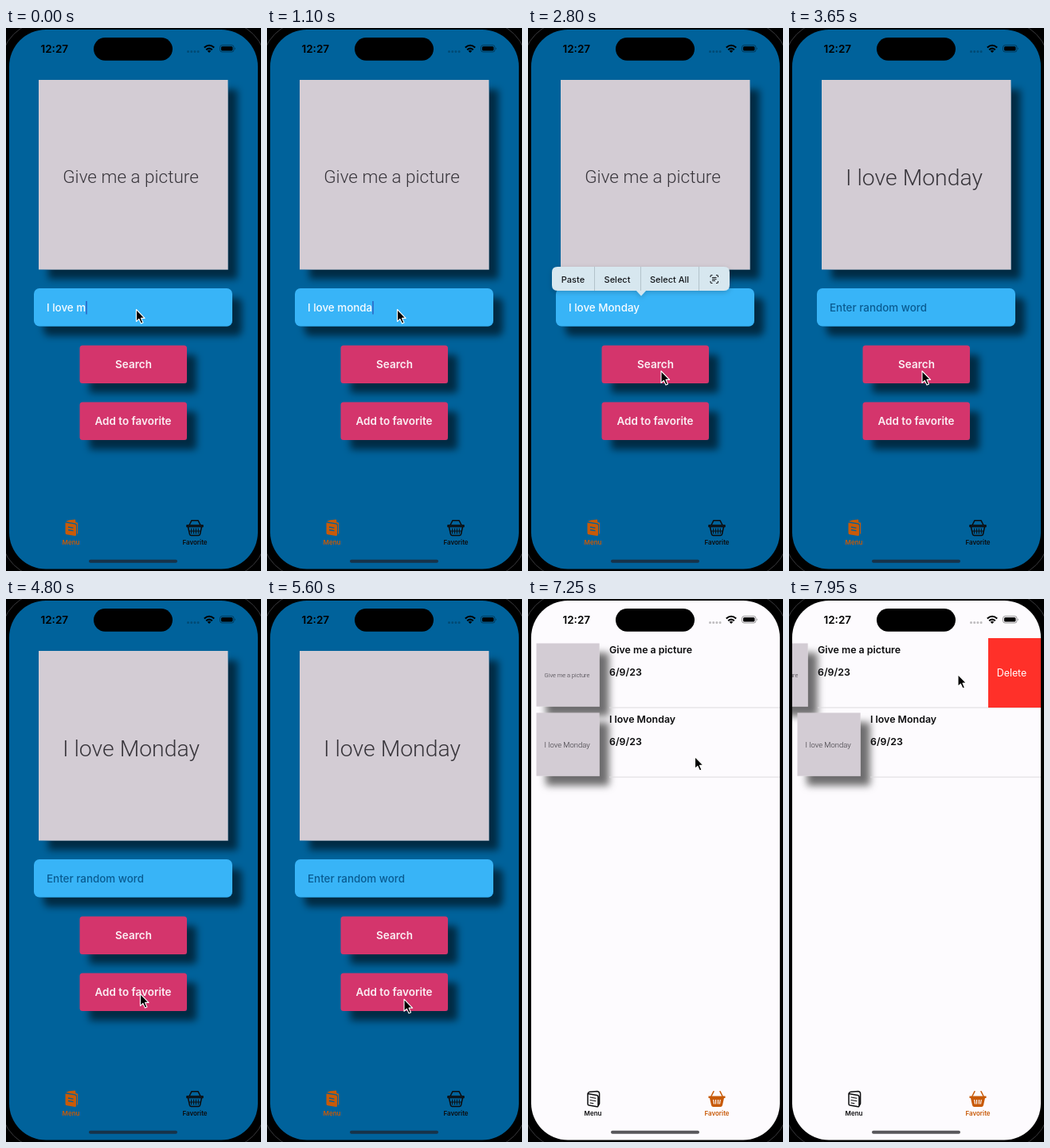
Write an HTML page that moves like this. It is 320 px wide and 680 px high and loops after 8 s.

```html
<!DOCTYPE html>
<html lang="en">
<head>
<meta charset="utf-8">
<title>Picture search</title>
<style>
  html, body { margin: 0; width: 100%; height: 100%; overflow: hidden; background: #000; }
  svg { display: block; width: 320px; height: 680px; font-family: Inter, "Open Sans", sans-serif; }
  .pic { font-family: Roboto, "Open Sans", sans-serif; font-weight: 300; fill: #38353b; text-anchor: middle; }
  .button { font-size: 13.5px; font-weight: 600; fill: #fbeef3; text-anchor: middle; }
  .field { font-size: 13.4px; font-weight: 550; }
  .list { font-size: 12.4px; font-weight: 600; fill: #0c0c0e; }
  .menu { font-size: 11px; font-weight: 500; fill: #15181c; text-anchor: middle; }
  .tab { font-size: 8px; font-weight: 600; text-anchor: middle; stroke: none; fill: currentColor; }
  .line { fill: none; stroke: currentColor; stroke-width: 1.5; stroke-linejoin: round; stroke-linecap: round; }
  .solid { fill: currentColor; }
</style>
</head>
<body>
<svg viewBox="0 0 320 680">
  <defs>
    <clipPath id="screen"><rect x="4" y="2" width="312" height="675.5" rx="46"/></clipPath>
    <filter id="shade" x="-20%" y="-40%" width="150%" height="200%">
      <feDropShadow dx="12" dy="12" stdDeviation="4.8" flood-color="#000" flood-opacity=".57"/>
    </filter>
    <filter id="soft" x="-20%" y="-30%" width="140%" height="180%">
      <feDropShadow dx="0" dy="2" stdDeviation="3" flood-opacity=".2"/>
    </filter>
    <g id="askPicture">
      <rect width="237.500" height="237.500" fill="#d3ccd4"/>
      <text class="pic" x="115.500" y="129" font-size="22.500">Give me a picture</text>
    </g>
    <g id="dayPicture">
      <rect width="237.500" height="237.500" fill="#d3ccd4"/>
      <text class="pic" x="116" y="132" font-size="28.400">I love Monday</text>
    </g>
    <g id="bookLine" class="line">
      <path d="M75 619.500 86.500 621.500Q88 622 88 623.500V634.500Q88 636 86.500 635.700L76.500 634Q75 633.700 75 632.200ZM75 619.500Q75.500 617.500 77.500 617.200L87 616.500Q89.500 617 89.600 619.500V632L88 635"/>
      <path d="M78 624 85 625.200M78 627.500 85 628.700M78 631 82 631.700" stroke-width="1.100"/>
    </g>
    <g id="bookSolid">
      <path class="solid" d="M74.500 619.500 86.500 621.500Q88 622 88 623.500V634.500Q88 636.300 86.500 636L76 634.300Q74.500 634 74.500 632.200ZM75 618 79 616.300 87 615.500 87.500 619 90 619.500V633L89 634V622Q88.800 620.800 87 620.300Z"/>
      <path d="M78 625 84.500 626.100M78 628.500 84.500 629.600" stroke="#00629b" stroke-width="1.300"/>
    </g>
    <g id="basketLine" class="line">
      <path d="M227 622.800H247V624.500H227ZM228.500 625 230.500 634Q231 635.500 232.500 635.500H241.500Q243 635.500 243.500 634L245.500 625M230 622.500 233 616.700H241L244 622.500"/>
      <path d="M232.700 627V633M235.600 627V633M238.400 627V633M241.300 627V633M230 630H244" stroke-width="1"/>
    </g>
    <g id="basketSolid">
      <path class="solid" d="M226.500 622.500H247.500V625H246L244 634Q243.500 636 241.500 636H232.500Q230.500 636 230 634L228 625H226.500Z"/>
      <path class="line" d="M230 622.500 233 616.700M244 622.500 241 616.700"/>
      <path d="M232.700 627 233.600 632.500M235.600 627V632.500M238.500 627V632.500M241.300 627 240.400 632.500" stroke="#fdfbfe" stroke-width="1.200"/>
    </g>
  </defs>

  <rect width="320" height="680" fill="#000"/>
  <rect x="-7" y="-9" width="334" height="698" rx="57" fill="none" stroke="#39393c"/>

  <g clip-path="url(#screen)">
    <rect id="back" width="320" height="680"/>

    <g id="menuPage">
      <g filter="url(#shade)"><use id="picture" x="41" y="65" href="#askPicture"/></g>
      <rect x="35" y="326" width="249" height="47.500" rx="7" fill="#39b4f7" filter="url(#shade)"/>
      <rect id="mark" y="341" height="19" fill="#00559b" fill-opacity=".38"/>
      <text class="field" x="51" y="354.800"><tspan id="typed"></tspan><tspan id="word"></tspan></text>
      <rect id="caret" y="342" width="1.500" height="16.500" fill="#2a62c4"/>
      <g id="searchButton">
        <rect x="92.500" y="397.500" width="134.500" height="47.500" rx="3.500" fill="#d4366c" filter="url(#shade)"/>
        <text class="button" x="160" y="426">Search</text>
      </g>
      <g id="addButton">
        <rect x="92.500" y="468.500" width="134.500" height="47.500" rx="3.500" fill="#d4366c" filter="url(#shade)"/>
        <text class="button" x="159.500" y="497">Add to favorite</text>
      </g>
      <g id="popup">
        <path filter="url(#soft)" fill="#d7e7ef" d="M37 299H246Q253 299 253 306V322Q253 329 246 329H148L142 335.500 136 329H37Q30 329 30 322V306Q30 299 37 299Z"/>
        <path d="M83.500 299V329M141.500 299V329M214.500 299V329" stroke="#b3c3cb"/>
        <text class="menu" x="56.500" y="318.500">Paste</text>
        <text class="menu" x="112" y="318.500">Select</text>
        <text class="menu" x="177.500" y="318.500">Select All</text>
        <path fill="none" stroke="#15181c" stroke-width="1.100" d="M229 312V311Q229 309.500 230.500 309.500H231.500M236 309.500H237Q238.500 309.500 238.500 311V312M238.500 317V318Q238.500 319.500 237 319.500H236M231.500 319.500H230.500Q229 319.500 229 318V317M231 312.500H236.500M231 314.500H236.500M231 316.500H235"/>
      </g>
    </g>

    <g id="listPage">
      <g id="firstRow">
        <g filter="url(#shade)"><use href="#askPicture" transform="translate(10.500 55.500) scale(.3333)"/></g>
        <text class="list" x="102" y="67.500">Give me a picture</text>
        <text class="list" x="102" y="95.500">6/9/23</text>
        <path d="M102 136H400" stroke="#dcdadd"/>
      </g>
      <g id="remove">
        <rect x="316" y="49" width="70" height="87" fill="#ff3029"/>
        <text x="345.500" y="97.300" font-size="12.400" fill="#fff" text-anchor="middle">Delete</text>
      </g>
      <g filter="url(#shade)"><use href="#dayPicture" transform="translate(10.500 142.500) scale(.3333)"/></g>
      <text class="list" x="102" y="154.500">I love Monday</text>
      <text class="list" x="102" y="182.500">6/9/23</text>
      <path d="M102 223H316" stroke="#dcdadd"/>
    </g>

    <g id="menuTab">
      <use id="book"/>
      <text class="tab" x="81.500" y="646.500">Menu</text>
    </g>
    <g id="listTab">
      <use id="basket"/>
      <text class="tab" x="237" y="646.500">Favorite</text>
    </g>

    <text x="43.500" y="31" font-size="13.500" font-weight="600">12:27</text>
    <rect x="110" y="12" width="99" height="28.700" rx="14.350"/>
    <path d="M228.500 29.500h.01M232.700 29.500h.01M236.900 29.500h.01M241.100 29.500h.01" stroke="#000" stroke-opacity=".25" stroke-width="3" stroke-linecap="round"/>
    <path d="M248.800 24.500Q255 19 261.200 24.500M251.200 27.200Q255 24 258.800 27.200" fill="none" stroke="#000" stroke-width="2.100"/>
    <path d="M252.700 28.700Q255 27 257.300 28.700L255 31Z"/>
    <rect x="268.500" y="21.500" width="17.500" height="8.500" rx="2.700" fill="none" stroke="#000" stroke-opacity=".4"/>
    <rect x="270" y="23" width="14.500" height="5.500" rx="1.500"/>
    <path d="M287.300 24.200Q289 25.700 287.300 27.300Z" fill-opacity=".5"/>
    <rect id="homeBar" x="104" y="665.800" width="111" height="4" rx="2"/>
  </g>

  <path id="cursor" d="M0 0V15L3.400 11.900 6 17.600 8.500 16.500 6 10.900H10.600Z" fill="#000" stroke="#fff" stroke-width="1.100" stroke-linejoin="round"/>
</svg>

<script>
const LOOP = 8000;
const el = id => document.getElementById(id);

// Each step: start, text before the last word, last word
const typing = [
  [0, "I love m", ""], [250, "I love mo", ""], [500, "I love mon", ""],
  [800, "I love mond", ""], [1050, "I love monda", ""], [1300, "I love monday", ""],
  [1550, "I love ", "monday"], [2400, "I love Monday", ""], [3100, "Enter random word", ""]
];

// Each step: time, x, y
const pointer = [
  [0, 163.500, 352.500], [2450, 163.500, 352.500], [2750, 167, 429.500], [4000, 167, 429.500],
  [4600, 168.500, 494.500], [5500, 168.500, 494.500], [6250, 239.500, 630.500], [6700, 239.500, 630.500],
  [7150, 209.500, 197.500], [7300, 209.500, 197.500], [7550, 278, 99], [7600, 278, 99],
  [7850, 212, 94.500], [LOOP, 212, 94.500]
];
const swipe = [[0, 0], [7600, 0], [7850, 66], [LOOP, 66]];

const ease = p => p * p * (3 - 2 * p);

function follow(steps, t) {
  const i = steps.findIndex(step => step[0] > t);
  const [from, ...a] = steps[i - 1], [to, ...b] = steps[i];
  const p = ease((t - from) / (to - from));
  return a.map((v, k) => v + (b[k] - v) * p);
}

const within = (t, from, to) => t >= from && t < to;
const show = (id, on) => el(id).style.display = on ? "" : "none";
const set = (id, attrs) => Object.entries(attrs).forEach(([k, v]) => el(id).setAttribute(k, v));

function drawField(t) {
  const [, lead, last] = typing.filter(step => step[0] <= t).pop();
  const empty = t >= 3100;
  el("typed").textContent = lead.replace(/ $/, "\u00a0");
  el("word").textContent = last;
  set("typed", { fill: empty ? "#0a5c92" : "#f7fcff" });
  set("word", { fill: "#c8deed" });
  const leadEnd = 51 + el("typed").getComputedTextLength();
  const end = last ? leadEnd + el("word").getComputedTextLength() : leadEnd;
  show("mark", last);
  if (last) set("mark", { x: leadEnd - 1, width: end - leadEnd + 2 });
  show("caret", t < 2550);
  set("caret", { x: end });
}

function draw(t) {
  const list = t >= 6500;
  show("menuPage", !list);
  show("listPage", list);
  set("back", { fill: list ? "#fdfbfe" : "#00629b" });
  set("homeBar", { fill: list ? "#58575b" : "#17334a" });
  set("book", { href: list ? "#bookLine" : "#bookSolid" });
  set("basket", { href: list ? "#basketSolid" : "#basketLine" });
  el("menuTab").style.color = list ? "#0c0c0e" : "#c85a08";
  el("listTab").style.color = list ? "#c85a08" : "#0c0c0e";

  if (!list) {
    drawField(t);
    set("picture", { href: t < 3500 ? "#askPicture" : "#dayPicture" });
    show("popup", within(t, 2500, 3100));
    set("searchButton", { opacity: within(t, 3000, 3150) ? .6 : 1 });
    set("addButton", { opacity: within(t, 5000, 5150) ? .6 : 1 });
  }

  const [shift] = follow(swipe, t);
  for (const id of ["firstRow", "remove"]) set(id, { transform: `translate(${-shift} 0)` });
  set("cursor", { transform: `translate(${follow(pointer, t)})` });
}

const start = performance.now();
function tick() {
  draw((performance.now() - start) % LOOP);
  requestAnimationFrame(tick);
}
tick();
</script>
</body>
</html>
```
